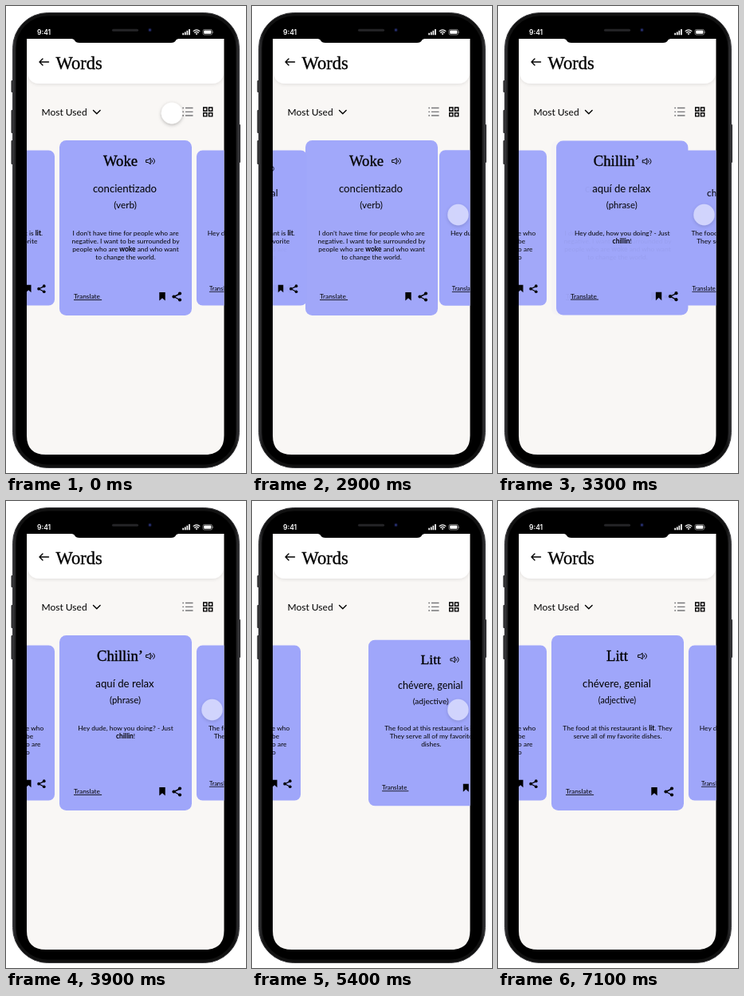
Write an HTML page that moves like this. It is 301x584 px and loops after 7400 ms.

```html
<!DOCTYPE html>
<html lang="en">
<head>
<meta charset="utf-8">
<title>Word cards</title>
<style>
  html, body { margin: 0; width: 100%; height: 100%; overflow: hidden; background: #fff; }
  svg { display: block; width: 301px; height: 584px; font-family: Lato, sans-serif; }
  .serif { font-family: "Liberation Serif", serif; stroke: #000; stroke-width: .35; }
  .line { fill: none; stroke: #000; stroke-width: 1.4; stroke-linecap: round; stroke-linejoin: round; }
  .mid { text-anchor: middle; }
  .body { font-size: 8.42px; text-anchor: middle; }
  .body tspan tspan { font-weight: bold; }
</style>
</head>
<body>
<svg viewBox="0 0 301 584">
  <defs>
    <clipPath id="screen"><path d="M26 41H273.5V537Q273.5 561 249.500 561H50Q26 561 26 537Z"/></clipPath>
    <linearGradient id="rim" x2="1" y2="0">
      <stop offset="0" stop-color="#37373a"/><stop offset=".02" stop-color="#111"/>
      <stop offset=".98" stop-color="#111"/><stop offset="1" stop-color="#37373a"/>
    </linearGradient>
    <filter id="soft" x="-50%" y="-50%" width="200%" height="200%">
      <feDropShadow dx="0" dy="1.500" stdDeviation="2" flood-opacity=".28"/>
    </filter>
    <filter id="faint" y="-20%" height="150%">
      <feDropShadow dx="0" dy="1" stdDeviation="2" flood-opacity=".1"/>
    </filter>
    <g id="tools">
      <path d="M42.300 80.500h7.400v10.500l-3.700-3.300-3.700 3.300z"/>
      <path class="line" d="M68 82.500l-7.500 3.500 7.500 4"/>
      <circle cx="60.500" cy="86" r="2.100"/><circle cx="68" cy="82" r="2.100"/><circle cx="68" cy="90" r="2.100"/>
    </g>
    <g id="speaker">
      <path class="line" style="stroke-width:1" d="M26-85h2.200l3-2.300v7.600l-3-2.300H26zM33-85q1.600 1.500 0 3M34.700-86.800q3.600 3.300 0 6.600"/>
    </g>
  </defs>

  <g fill="#262628">
    <rect x="6.500" y="93" width="4" height="15" rx="1"/>
    <rect x="6.500" y="130" width="4" height="29" rx="1"/>
    <rect x="6.500" y="168" width="4" height="30" rx="1"/>
    <rect x="290" y="148" width="4" height="48" rx="1"/>
  </g>
  <rect x="8.500" y="8.500" width="284" height="569" rx="44" fill="url(#rim)" stroke="#39393c"/>
  <rect x="12.500" y="12.500" width="276" height="561" rx="40"/>

  <g clip-path="url(#screen)">
    <rect x="26" y="41" width="248" height="520" fill="#f9f7f5"/>
    <rect x="27" y="20" width="246" height="77" rx="14" fill="#fff" filter="url(#faint)"/>
    <path class="line" d="M53.500 70H42M46 66l-4 4 4 4"/>
    <text class="serif" x="62.500" y="79" font-size="22.500">Words</text>
    <text x="44.500" y="136.500" font-size="12">Most Used</text>
    <path class="line" d="M109.500 130.500l4.300 4.300 4.300-4.300"/>
    <path d="M225 127.500h9.500M225 132.300h9.500M225 137h9.500M221.300 127.500h1.700M221.300 132.300h1.700M221.300 137h1.700" stroke="#77777a" stroke-width="1.300"/>
    <path class="line" style="stroke-linejoin:miter" d="M247.700 127h4.200v4.200h-4.200zM254.500 127h4.200v4.200h-4.200zM247.700 133.700h4.200v4.200h-4.200zM254.500 133.700h4.200v4.200h-4.200z"/>
    <g id="cards"></g>
    <circle id="cursor" r="13.200" fill="#fff" filter="url(#soft)"/>
  </g>

  <path d="M80 40.500Q85 41 86 43Q87.500 46 92 46H207Q211.500 46 213 43Q214 41 219 40.500Z"/>
  <rect x="133" y="28.800" width="33" height="3" rx="1.500" fill="#242427"/>
  <circle cx="180.500" cy="30" r="2.200" fill="#15183c"/><circle cx="180.500" cy="30" r=".9" fill="#31408c"/>
  <g fill="#fff">
    <text x="39" y="36" font-size="8.500" font-weight="600" style="font-family:Inter,sans-serif">9:41</text>
    <path d="M221.300 33.800h1.700v2.400h-1.700zM223.900 32.400h1.700v3.800h-1.700zM226.500 30.800h1.700v5.400h-1.700zM229.100 29h1.700v7.200h-1.700z"/>
    <path d="M239 36.300l-1.500-1.700q1.500-1.300 3 0z"/>
    <path fill="none" stroke="#fff" stroke-width="1.200" d="M234.700 31.600q4.300-3.600 8.600 0M236.200 33.500q2.800-2.400 5.600 0"/>
    <rect x="247" y="29.400" width="11.600" height="6.600" rx="1.800" fill="none" stroke="#aaa" stroke-width=".7"/>
    <rect x="248.200" y="30.600" width="9.200" height="4.200" rx=".8"/><path d="M259.500 31.500q1.300 1.200 0 2.400z"/>
  </g>
</svg>
<script>
const LOOP = 7400, MID = 150, LEFT = -12.5, RIGHT = 312.5, SIDE = 0.886;
const WORDS = {
  litt: {
    title: 'Litt', titleX: -0.5, meaning: 'chévere, genial', kind: '(adjective)', kindSize: 10.7,
    wide: 'The food at this restaurant is *lit*. They|serve all of my favorite dishes.',
    narrow: 'The food at this restaurant is *lit*.|They serve all of my favorite|dishes.'
  },
  chillin: {
    title: 'Chillin’', titleX: -7, meaning: 'aquí de relax', kind: '(phrase)', kindSize: 11.4,
    wide: 'Hey dude, how you doing? - Just|*chillin*!',
    narrow: 'Hey dude, how you doing? - Just|*chillin*!'
  },
  woke: {
    title: 'Woke', titleX: -6.5, meaning: 'concientizado', kind: '(verb)', kindSize: 11.8,
    wide: 'I don’t have time for people who are|negative. I want to be surrounded by|people who are *woke* and who want|to change the world.',
    narrow: 'I don’t have time for people who|are negative. I want to be|surrounded by people who are|*woke* and who want to|change the world.'
  }
};

const body = (text, kind) => `<text class="body ${kind}">` + text.split('|').map((line, i) =>
  `<tspan x="0" y="${9.3 + i * 10.2}">${line.replace(/\*(.+?)\*/g, '<tspan>$1</tspan>')}</tspan>`).join('') + '</text>';

function makeCard(word) {
  const node = document.createElementNS('http://www.w3.org/2000/svg', 'g');
  node.innerHTML = `<g class="scaled">
    <rect x="-83" y="-109.5" width="166" height="219" rx="8.500" fill="#9fa6fa"/>
    <text class="serif mid" x="${word.titleX}" y="-77.5" font-size="18.700">${word.title}</text>
    <use href="#speaker"/>
    <text class="mid" x="-1" y="-44.5" font-size="13.200">${word.meaning}</text>
    <text class="mid" x="-0.5" y="-24.5" font-size="${word.kindSize}">${word.kind}</text>
    <text x="-65" y="88.500" font-size="8.400" text-decoration="underline">Translate&nbsp;</text>
    <use href="#tools"/></g>` + body(word.wide, 'wide') + body(word.narrow, 'narrow');
  document.getElementById('cards').append(node);
  const [scaled, wide, narrow] = ['.scaled', '.wide', '.narrow'].map(s => node.querySelector(s));
  return (x, scale, opacity = 1) => {
    node.setAttribute('transform', `translate(${x} 277.5)`);
    node.setAttribute('opacity', opacity);
    scaled.setAttribute('transform', `scale(${scale})`);
    wide.style.display = scale > 0.95 ? '' : 'none';
    narrow.style.display = scale > 0.95 ? 'none' : '';
    return node;
  };
}

// Later cards are painted above earlier ones.
const litt = makeCard(WORDS.litt);
const wokeLeft = makeCard(WORDS.woke);
const chillin = makeCard(WORDS.chillin);
const wokeMid = makeCard(WORDS.woke);
const littFront = makeCard(WORDS.litt);
const cursor = document.getElementById('cursor');

const mix = (a, b, k) => a + (b - a) * k;
const progress = (t, from, to) => Math.min(1, Math.max(0, (t - from) / (to - from)));
const easeOut = k => 1 - (1 - k) ** 2;
const easeInOut = k => k * k * (3 - 2 * k);
const tap = (t, from, to) => Math.sin(Math.PI * progress(t, from, to));

function render(t) {
  const first = easeOut(progress(t, 2895, 3395));
  const second = easeOut(progress(t, 5240, 5740));

  litt(mix(LEFT, RIGHT, first), SIDE, second > 0 ? 0 : 1);
  littFront(mix(RIGHT, MID, second), mix(SIDE, 1, second), second > 0 ? 1 : 0);
  wokeLeft(LEFT, SIDE, first);
  wokeMid(MID, 1, 1 - first);
  chillin(mix(mix(RIGHT, MID, first), RIGHT, second), mix(mix(SIDE, 1, first), SIDE, second));

  const travel = easeInOut(progress(t, 1800, 2600));
  const exit = easeInOut(progress(t, 6620, 7090));
  const x = mix(mix(208, 258.5, travel), 207, exit);
  const y = mix(mix(134, 261, travel), 59, exit);
  const size = 1 - 0.08 * (tap(t, 2600, 2890) + tap(t, 5020, 5260));
  cursor.setAttribute('transform', `translate(${x} ${y}) scale(${size})`);
  cursor.setAttribute('opacity', mix(1, 0.52, travel) * (1 - exit));
}

function tick() {
  render(performance.now() % LOOP);
  requestAnimationFrame(tick);
}
tick();
</script>
</body>
</html>
```
